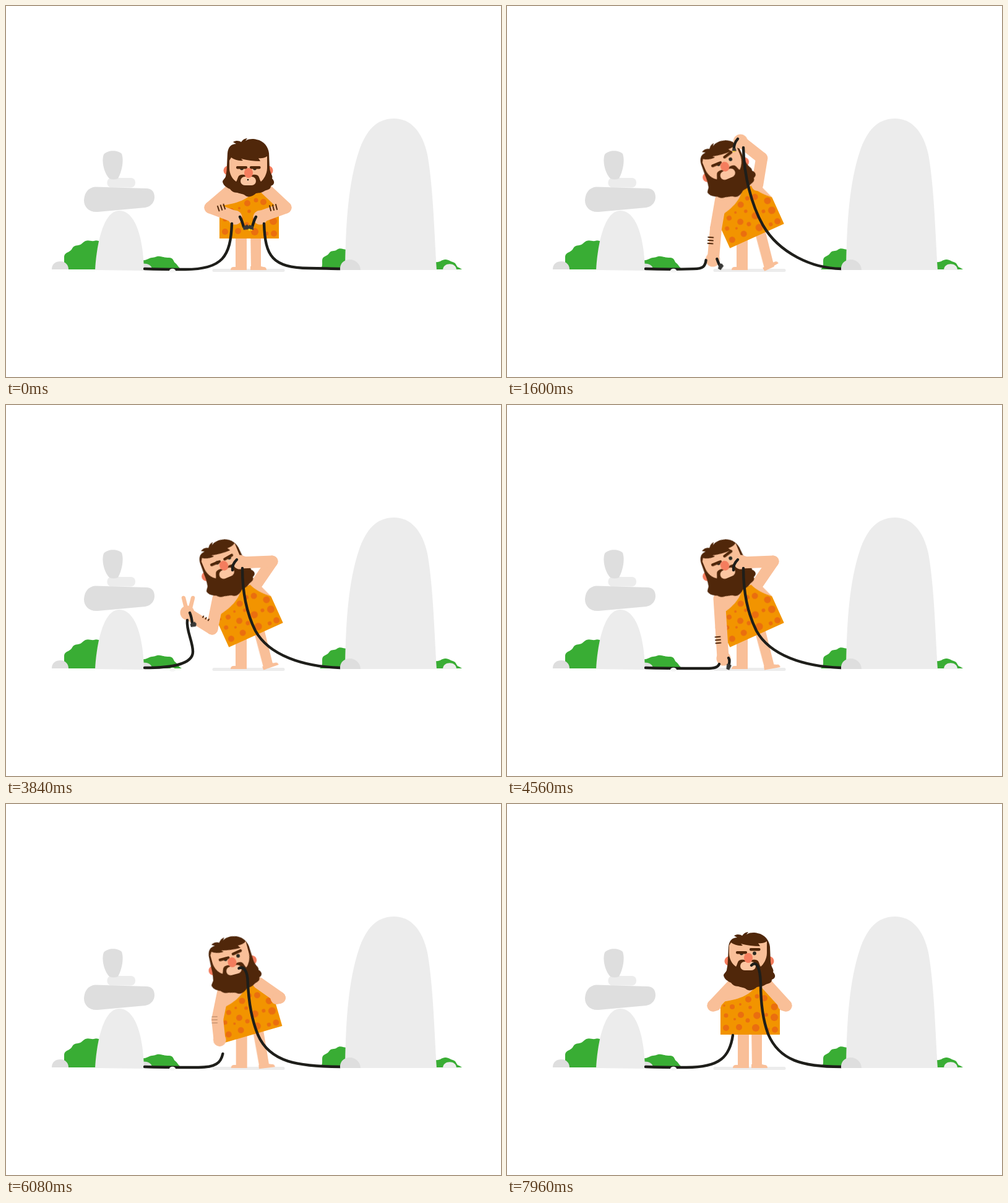
Write an HTML page that moves like this. It is 800x600 px and loops after 8000 ms.

```html
<!DOCTYPE html>
<html lang="en">
<head>
<meta charset="utf-8">
<title>Stone age cables</title>
<style>
html, body { margin: 0; width: 100%; height: 100%; overflow: hidden; background: #fff; }
svg { display: block; width: 100vw; height: 100vh; }

.light { fill: #ececec; }
.dark { fill: #dedede; }
.bush { fill: #39ad34; }
.skin { fill: #f9bf98; }
.hair { fill: #50270a; }
.blush { fill: #f47d5e; }
.arm { fill: none; stroke: #f9bf98; stroke-width: 19; stroke-linecap: round; }
.finger { stroke: #f9bf98; stroke-width: 6.5; stroke-linecap: round; }
.cable { fill: none; stroke: #1e1e1a; stroke-width: 4.4; stroke-linecap: round; }
.mark { fill: none; stroke: #50270a; stroke-width: 2; stroke-linecap: round; }

.move { animation: 8s ease-in-out infinite; }
#torso { animation-name: torso; transform-origin: 393px 373px; }
#head { animation-name: head; transform-origin: 392px 266px; }
#ears { animation-name: ears; }
#face { animation-name: face; }
#eyes { animation-name: eyes; }
#brow { animation-name: brow; transform-origin: 402px 261px; }
#dot { animation-name: dot; }
#shout { animation-name: shout; }
#legL { animation-name: legL; }
#legR { animation-name: legR; transform-origin: 404px 370px; }
#foot { animation-name: foot; transform-origin: 396px 427px; }
#upperL { animation-name: upperL; }
#foreL { animation-name: foreL; }
#handL { animation-name: handL; }
#sign { animation-name: sign; }
#upperR { animation-name: upperR; }
#foreR { animation-name: foreR; }
#handR { animation-name: handR; }
#marksL { animation-name: marksL; }
#marksR { animation-name: marksR; }
#cableL { animation-name: cableL; }
#tipL { animation-name: tipL; }
#plugL { animation-name: plugL; }
#endL { animation-name: endL; }
#cableR { animation-name: cableR; }
#tipR { animation-name: tipR; }
#plugR { animation-name: plugR; }
#endR { animation-name: endR; }

/* Body */
@keyframes torso {
  0%, 2% { transform: translate(0, 3px) rotate(0deg); }
  6%, 74% { transform: translate(11px, -1px) rotate(-24.4deg); }
  79%, 100% { transform: translate(0, 0) rotate(0deg); }
}
@keyframes head {
  0%, 2% { transform: translate(0, 0) rotate(0deg); }
  6%, 74% { transform: translate(-36px, 3px) rotate(-22.7deg); }
  79%, 100% { transform: translate(0, -7px) rotate(0deg); }
}
@keyframes ears {
  0%, 2% { transform: translateY(0); }
  6%, 100% { transform: translateY(-5px); }
}
@keyframes face {
  0%, 2% { transform: translate(0, 0); }
  6%, 90% { transform: translate(0, -14px); }
  92%, 100% { transform: translate(-2px, -14px); }
}
@keyframes eyes {
  0%, 2%, 79%, 100% { transform: translate(0, 0); }
  6%, 43%, 55%, 74% { transform: translate(3px, 0); }
  45%, 52% { transform: translate(3px, -1px); }
}
@keyframes brow {
  0%, 2%, 79%, 90% { transform: translate(0, 0) rotate(0deg); }
  6%, 43%, 55%, 74% { transform: translate(1px, -7px) rotate(-14deg); }
  45%, 52% { transform: translate(1px, -1px) rotate(-7deg); }
  92%, 100% { transform: translate(0, -5px) rotate(0deg); }
}
@keyframes dot { 0%, 3% { opacity: 1; } 3.01%, 100% { opacity: 0; } }
@keyframes shout { 0%, 4% { opacity: 0; } 4.01%, 20% { opacity: 1; } 20.01%, 100% { opacity: 0; } }
@keyframes legL {
  0%, 74% { transform: translateX(-2px); }
  79%, 100% { transform: translateX(0); }
}
@keyframes legR {
  0%, 2%, 79%, 100% { transform: translate(0, 0) rotate(0deg); }
  6%, 74% { transform: translate(7px, 1px) rotate(-14deg); }
}
@keyframes foot {
  0%, 2%, 79%, 100% { transform: rotate(0deg); }
  6%, 19% { transform: rotate(-15deg); }
  23%, 42% { transform: rotate(-19deg); }
  47%, 52% { transform: rotate(-5deg); }
  57%, 74% { transform: rotate(4deg); }
}

/* Arms */
@keyframes upperL {
  0%, 2% { d: path("M365 296L330 326"); }
  6%, 19% { d: path("M346 313L337 360"); }
  23%, 42.5% { d: path("M343 313L341 360"); }
  44.5% { d: path("M343 313L308 275"); }
  47%, 51% { d: path("M343 313L333 362"); }
  54.5%, 74% { d: path("M343 313L346 360"); }
  79%, 100% { d: path("M365 292L333 326"); }
}
@keyframes foreL {
  0%, 2% { d: path("M330 326L370 341"); }
  6%, 19% { d: path("M337 360L332 408"); }
  23%, 42.5% { d: path("M341 360L342 408"); }
  44.5% { d: path("M308 275L287 225"); }
  47%, 51% { d: path("M333 362L293 337"); }
  54.5%, 74% { d: path("M346 360L349 408"); }
  79%, 100% { d: path("M333 326L337 325"); }
}
@keyframes handL {
  0%, 2% { transform: translate(370px, 342px) scale(1); }
  6%, 19% { transform: translate(331px, 410px) scale(1); }
  23%, 42.5% { transform: translate(342px, 411px) scale(1); }
  44.5% { transform: translate(287px, 225px) scale(1); }
  47%, 51% { transform: translate(293px, 336px) scale(1); }
  54.5%, 74% { transform: translate(350px, 410px) scale(1); }
  79%, 100% { transform: translate(336px, 326px) scale(.7); }
}
@keyframes sign {
  0%, 43% { transform: scale(0); }
  44.5%, 52% { transform: scale(1); }
  53.5%, 100% { transform: scale(0); }
}
@keyframes upperR {
  0%, 2% { d: path("M420 296L452 326"); }
  6%, 18.5% { d: path("M404 290L404 243"); }
  22.5%, 58% { d: path("M406 288L430 253"); }
  62%, 74% { d: path("M402 288L438 307"); }
  79%, 100% { d: path("M420 292L451 326"); }
}
@keyframes foreR {
  0%, 2% { d: path("M452 326L411 341"); }
  6%, 18.5% { d: path("M404 243L379 205"); }
  22.5%, 58% { d: path("M430 253L378 255"); }
  62%, 74% { d: path("M438 307L432 309"); }
  79%, 100% { d: path("M451 326L447 325"); }
}
@keyframes handR {
  0%, 2% { transform: translate(411px, 342px) scale(1); }
  6%, 18.5% { transform: translate(377px, 204px) scale(1); }
  22.5%, 58% { transform: translate(378px, 254px) scale(1); }
  62%, 74% { transform: translate(433px, 309px) scale(.7); }
  79%, 100% { transform: translate(448px, 326px) scale(.7); }
}
@keyframes marksL {
  0%, 2% { transform: translate(348px, 326px) rotate(72deg); opacity: 1; }
  6%, 19% { transform: translate(328px, 379px) rotate(5deg); }
  23%, 42.5% { transform: translate(335px, 380px) rotate(0deg); }
  44.5% { transform: translate(292px, 255px) rotate(160deg) scale(1); }
  47%, 51% { transform: translate(323px, 345px) rotate(120deg) scale(.4, 1); }
  54.5%, 74% { transform: translate(341px, 380px) rotate(-5deg) scale(1); opacity: 1; }
  77%, 100% { transform: translate(336px, 340px) rotate(0deg) scale(1); opacity: 0; }
}
@keyframes marksR {
  0%, 2% { transform: translate(432px, 326px); opacity: 1; }
  4%, 100% { transform: translate(418px, 275px); opacity: 0; }
}

/* Cables */
@keyframes cableL {
  0%, 2% { d: path("M224 425C250 426 270 426 290 426C350 426 363 405 365 352"); }
  6%, 19% { d: path("M224 425C250 426 270 426 300 425C316 425 319 420 320 410"); }
  23%, 42.5% { d: path("M224 425C250 426 270 426 314 426C327 426 330 423 332 418"); }
  44.5% { d: path("M224 425C262 425 296 410 298 370C300 330 288 290 287 237"); }
  47%, 51% { d: path("M224 425C262 425 302 421 302 399C302 382 291 365 293 348"); }
  54.5%, 74% { d: path("M224 425C250 426 270 426 322 426C336 426 341 424 343 419"); }
  79%, 100% { d: path("M224 425C250 426 270 426 290 426C345 426 360 408 365 374"); }
}
@keyframes tipL {
  0%, 2% { d: path("M378 341Q381 346 384 357"); }
  6%, 19% { d: path("M338 409Q341 419 344 421"); }
  23%, 42.5% { d: path("M348 409Q353 413 349 421"); }
  44.5% { d: path("M291 224Q295 232 297 242"); }
  47%, 51% { d: path("M297 336Q300 343 301 353"); }
  54.5%, 100% { d: path("M358 409Q361 413 358 422"); }
}
@keyframes plugL {
  0%, 2% { transform: translate(388px, 358px) rotate(-15deg); }
  6%, 19% { transform: translate(345px, 421px) rotate(-65deg); }
  23%, 42.5% { transform: translate(346px, 422px) rotate(-40deg); }
  44.5% { transform: translate(299px, 245px) rotate(-15deg); }
  47%, 51% { transform: translate(303px, 355px) rotate(-15deg); }
  54.5%, 100% { transform: translate(358px, 423px) rotate(-70deg); }
}
@keyframes endL { 0%, 76% { opacity: 1; } 76.01%, 100% { opacity: 0; } }
@keyframes cableR {
  0%, 2% { d: path("M540 425C525 425 510 424 490 424C430 423 419 405 417 352C417 352 417 352 417 352"); }
  6%, 18.5% { d: path("M540 425C500 425 446 398 418 350C398 316 383 262 382 214C382 214 382 214 382 214"); }
  22.5%, 58% { d: path("M540 425C480 423 425 405 403 365C388 335 382 300 382 264C382 264 382 264 382 264"); }
  62%, 74% { d: path("M540 425C470 424 420 420 399 375C382 335 381 300 380 287C380 274 374 266 366 268"); }
  79%, 90% { d: path("M540 425C478 425 440 415 424 372C414 345 412 310 412 290C411 263 405 253 397 261"); }
  92%, 100% { d: path("M540 425C478 425 440 415 422 372C412 345 410 310 410 290C409 263 403 253 395 261"); }
}
@keyframes tipR {
  0%, 2% { d: path("M404 341Q401 346 398 357"); }
  6%, 18.5% { d: path("M373 200Q367 207 367 217"); }
  22.5%, 100% { d: path("M373 250Q365 258 366 267"); }
}
@keyframes plugR {
  0%, 2% { transform: translate(396px, 358px) rotate(15deg) scale(1); }
  6%, 18.5% { transform: translate(368px, 218px) rotate(5deg) scale(1); }
  22.5%, 100% { transform: translate(366px, 266px) rotate(0deg) scale(0); }
}
@keyframes endR { 0%, 59% { opacity: 1; } 59.01%, 100% { opacity: 0; } }
</style>
</head>
<body>
<svg viewBox="0 0 800 600">
  <!-- Landscape -->
  <path class="bush" d="M94 426V407C94 397 103 400 107 392C112 384 118 390 124 383C131 376 137 381 142 380Q147 378 152 381V426Z"/>
  <path class="dark" d="M74 426C74 417 80 413 88 413S101 419 101 426Z"/>
  <path class="bush" d="M215 426V411C228 413 230 407 236 407S243 404 249 405S258 407 264 407C272 408 270 414 274 416C278 419 278 423 284 426Z"/>
  <path class="dark" d="M215 425V417C227 415 235 418 236 425Z"/>
  <path class="light" d="M144 427C146 390 156 331 183 331S222 378 223 428Z"/>
  <rect class="light" x="163.500" y="278" width="45.500" height="15.500" rx="7"/>
  <path class="dark" d="M144 292.500L226 295C236 295 240 301 240 309S235 324 225 326L148 333C134 334 126 325 126 314C127 301 133 294 144 292.500Z"/>
  <path class="dark" d="M158 240C165 232 181 233 187 239C191 250 187 268 181 279Q174 282 167 279C158 270 154 250 158 240Z"/>
  <path class="bush" d="M507 426C512 422 511 418 511 412C511 404 518 406 522 400C526 394 530 398 535 394S545 394 552 394V426Z"/>
  <path class="bush" d="M690 426V413C701 417 704 409 711 410S717 413 722 414C729 416 727 422 732 423L737 426Z"/>
  <path class="light" d="M706 427C706 414 728 414 728 427Z"/>
  <path class="light" d="M548 427C549 360 552 290 570 236C582 200 600 182 627 182S673 203 681 240C690 290 692 360 696 427Z"/>
  <path d="M336 427.500H448" stroke="#ececec" stroke-width="5" stroke-linecap="round"/>

  <!-- Body -->
  <path id="legL" class="move skin" d="M373 360H391V427H365Q365 422 370 422H373Z"/>
  <g id="legR" class="move skin">
    <path d="M395 360H412V424L396 427Z"/>
    <path id="foot" class="move" d="M395 427V421H412L416 422Q421 422 421 427Z"/>
  </g>
  <g id="torso" class="move">
    <path class="skin" d="M360 285H426L441 326L345 325Z"/>
    <path fill="#f29400" d="M345 373V320C375 317 392 309 402 295H418C422 306 430 316 441 326V373Z"/>
    <g id="spots" fill="#ea6e0f"></g>
  </g>
  <path id="upperL" class="move arm" d="M365 296L330 326"/>
  <path id="upperR" class="move arm" d="M420 296L452 326"/>

  <!-- Head -->
  <g id="head" class="move">
    <g id="ears" class="move blush"><circle cx="359" cy="266" r="7.500"/><circle cx="424" cy="266" r="7.500"/></g>
    <path class="hair" d="M357 258L358 238C359 228 364 223 372 223L367 220C372 217 377 218 380 220Q384 214 390 214L387 218C394 214 401 215 405 216C417 218 424 228 425 238L426 262C427 272 432 274 430 279C435 284 434 289 428 291C428 297 422 297 418 299C412 303 408 302 404 303C398 309 390 310 386 306C382 303 378 304 374 302C368 302 364 299 362 296C357 294 352 290 351 287C348 282 353 281 355 276C356 270 357 266 357 258Z"/>
    <g id="face" class="move">
      <path class="skin" d="M361 250L364 245Q372 251 383 250L380 247Q395 251 411 251L408 246Q416 247 422 243V262C422 272 416 281 412 284C409 280 410 274 404 273S393 275 392 278C390 275 386 272 380 273S375 280 372 284C366 280 361 272 361 262Z"/>
      <rect x="379" y="276" width="25" height="14" rx="7" fill="#fbc6a2"/>
      <circle id="dot" class="move" cx="391" cy="281" r="1.200"/>
      <g id="shout" class="move">
        <ellipse cx="383" cy="276" rx="5" ry="3.500" fill="#e3120b"/>
        <path d="M378 275Q383 270 388 274" fill="none" stroke="#1e1e1a" stroke-width="1.500"/>
      </g>
      <g id="eyes" class="move" fill="#2a2a22"><circle cx="381" cy="262.500" r="2.900"/><circle cx="402" cy="262.500" r="2.900"/></g>
      <rect class="hair" x="372" y="259" width="18" height="4.400" rx="1.800"/>
      <rect id="brow" class="move hair" x="394" y="259" width="17.500" height="4.400" rx="1.800"/>
      <ellipse class="blush" cx="392" cy="270" rx="7" ry="8"/>
    </g>
  </g>

  <!-- Forearms and cables -->
  <path id="foreL" class="move arm" d="M330 326L370 341"/>
  <g id="handL" class="move">
    <circle class="skin" r="11.500"/>
    <path id="sign" class="move finger" d="M-2 -8L-6 -24M5 -8L9 -24"/>
  </g>
  <path id="foreR" class="move arm" d="M452 326L411 341"/>
  <circle id="handR" class="move skin" r="11.500"/>
  <path id="marksL" class="move mark" d="M-4 -5H4M-4 0H4M-4 5H4"/>
  <path id="marksR" class="move mark" d="M-6 -3L-4 5M-1 -4L1 4M4 -5L6 3"/>
  <path id="cableL" class="move cable" d="M224 425"/>
  <path id="cableR" class="move cable" d="M540 425"/>
  <g id="endL" class="move">
    <path id="tipL" class="move cable" d="M378 341"/>
    <path id="plugL" class="move" fill="#383836" d="M-5 -2L3 -4L5 0L3 4L-5 3Z"/>
  </g>
  <g id="endR" class="move">
    <path id="tipR" class="move cable" d="M404 341"/>
    <g id="plugR" class="move">
      <path fill="#f7d417" d="M-3 2H0V6H-3ZM1 2H3V5H1Z"/>
      <path fill="#383836" d="M-4 -3H3L5 3H-5Z"/>
    </g>
  </g>
  <path class="dark" d="M540 427C539 415 548 410 556 410S573 417 573 427Z"/>
  <ellipse cx="269" cy="428" rx="5" ry="3.200" fill="#f6f6f6"/>
</svg>
<script>
// Dress spots: x, y, radius
const spots = [
  [390, 316, 5], [416, 314, 5], [404, 311, 3.5], [432, 328, 5.5], [364, 328, 4],
  [393, 329, 2.8], [378, 341, 5], [404, 342, 5.8], [432, 345, 6], [354, 342, 3.5],
  [389, 350, 3.5], [402, 362, 6], [375, 361, 5], [354, 362, 5], [433, 365, 5],
  [421, 365, 3.2], [419, 341, 3], [368, 348, 2], [377, 324, 2], [351, 326, 1.8]
];
document.getElementById("spots").innerHTML = spots
  .map(([x, y, r]) => `<circle cx="${x}" cy="${y}" r="${r}"/>`).join("");
</script>
</body>
</html>
```
